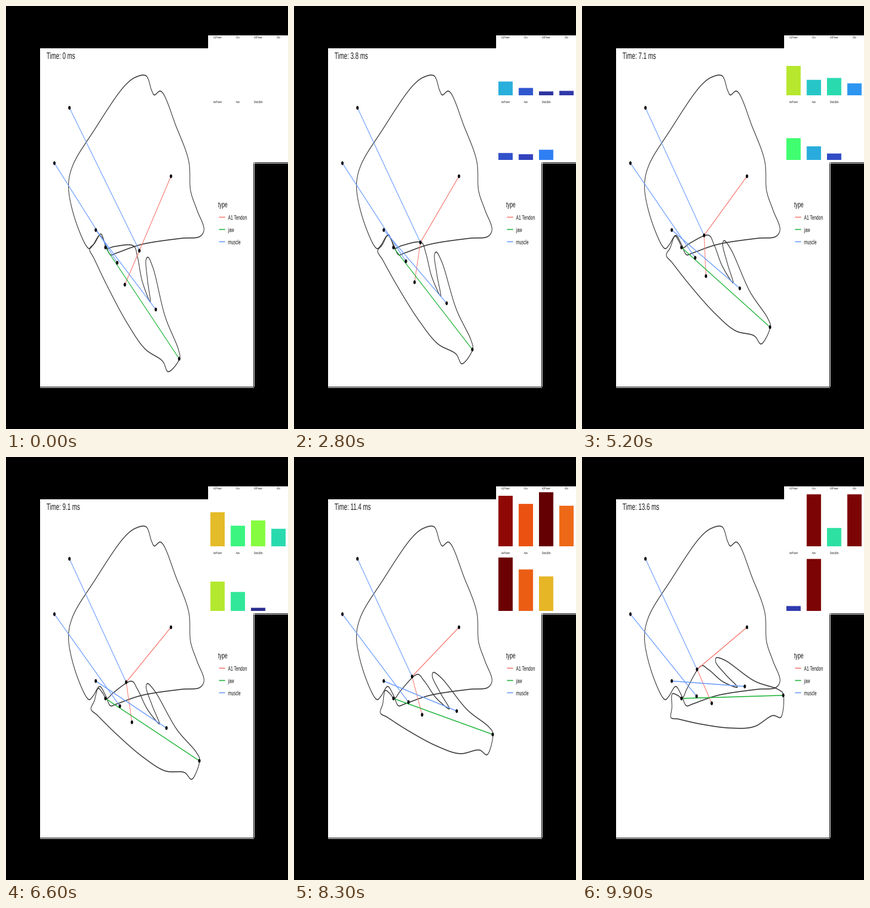
Write a matplotlib script that moves like this. It is 480 px wide and 720 px high and loops after 10 s.

```python
import numpy as np
import matplotlib.pyplot as plt
from matplotlib.animation import FuncAnimation
from matplotlib.colors import LinearSegmentedColormap
from matplotlib.patches import Ellipse, PathPatch, Rectangle
from matplotlib.path import Path
from matplotlib.textpath import TextPath
from matplotlib.transforms import Affine2D

W, H, DPI, N = 480, 720, 100, 100
SQUEEZE = 1.585                      # the whole plot is narrowed by this factor
ASPECT = np.array([SQUEEZE, 1])
STROKE = 1.6
INK, RED, GREEN, BLUE = "#303030", "#f8766d", "#1fb53a", "#6b9cff"
HEAT = LinearSegmentedColormap.from_list("heat", [
    "#24195c", "#323fb9", "#2f87fc", "#24d0c0", "#40fe70", "#98fb31",
    "#ddce2c", "#f4901f", "#e9460f", "#aa0c05", "#640004"])
BAR_MAX = 92

PIVOT = np.array([169.3, 411])
BACK, LEFT, TOP, INNER = (108, 173.3), (82.4, 267.5), (280.8, 289.8), (152.8, 381.3)
# tendon end, two muscle ends and jaw tip, all fixed to the jaw
ENDS = [(202.3, 474.3), (189.3, 437), (255, 516.6), (294.8, 600.4)]

SKULL = [
    (238, 118.5), (248, 144), (252.5, 151.5), (263, 144.8), (290, 206), (311, 264),
    (314.3, 315), (325, 347), (337, 381), (330, 392.3), (298, 395.5), (230, 406),
    (188, 420.5), (178, 423.5), (169, 405), (159.5, 390.5), (148, 407),
    (141.5, 413), (122, 376), (106.5, 310), (113, 273), (151, 210), (201, 137),
    (220, 121.5)]
JAW = [
    (171, 412.5), (184, 409.5), (217, 408.3), (223.7, 427), (232, 469),
    (245.5, 503.5), (240.8, 466), (238.5, 431), (241.5, 427.5), (250, 445),
    (271, 529), (293.5, 585), (295.5, 600), (276, 622.5), (266.5, 604.5),
    (237, 584), (207, 541), (173, 478), (150, 430), (142.3, 413.5),
    (150.5, 404.3), (161.5, 388), (167, 400)]


def smooth(pts, n=400):
    """Closed cubic curve through the points, centripetal spacing."""
    p = np.array(pts[-2:] + pts + pts[:3], float)
    k = np.r_[0, np.cumsum(np.sqrt(np.hypot(*np.diff(p, axis=0).T)))]
    m = np.gradient(p, k, axis=0)
    at = np.linspace(k[2], k[-3], n, endpoint=False)
    i = np.searchsorted(k, at, side="right") - 1
    d = (k[i + 1] - k[i])[:, None]
    t = (at - k[i])[:, None] / d
    return ((1 + 2 * t) * (1 - t) ** 2 * p[i] + t * (1 - t) ** 2 * d * m[i]
            + t * t * (3 - 2 * t) * p[i + 1] + t * t * (t - 1) * d * m[i + 1])


def ribbon(pts, closed=False):
    """Outline of a pen stroke that is narrowed together with the plot."""
    q = np.asarray(pts, float) * ASPECT
    t = np.roll(q, -1, 0) - np.roll(q, 1, 0) if closed else np.gradient(q, axis=0)
    n = np.column_stack([-t[:, 1], t[:, 0]])
    n *= STROKE / 2 / np.maximum(np.hypot(*t.T), 1e-9)[:, None]
    a, b = (q + n) / ASPECT, ((q - n) / ASPECT)[::-1]
    if not closed:
        return Path(np.vstack([a, b, a[:1]]), closed=True)
    return Path.make_compound_path(*(Path(np.vstack([s, s[:1]]), closed=True) for s in (a, b)))


def rotate(pts, deg):
    x, y = ((np.asarray(pts, float) - PIVOT) * ASPECT).T
    c, s = np.cos(np.radians(deg)), np.sin(np.radians(deg))
    return np.column_stack([x * c + y * s, y * c - x * s]) / ASPECT + PIVOT


def glyphs(text, x, y, size, center=False):
    path = TextPath((0, 0), text, size=size, prop={"family": "Liberation Sans"})
    if center:
        x -= path.get_extents().width / SQUEEZE / 2
    return path.transformed(Affine2D().scale(1 / SQUEEZE, -1).translate(x, y))


def clock_path(f):
    ms = f"{13.6 * f / (N - 1):.1f}" if f else "0"
    return glyphs(f"Time: {ms} ms", 69, 90, 15.7)


def ease(u, start, end):
    x = np.clip((u - start) / (end - start), 0, 1)
    return x * x * (3 - 2 * x)


def closing(u):
    """Jaw rotation in degrees."""
    return 44.7 * u**2 + 102 * u**3 * (1 - u) * (0.765 - u)


def bend(u):
    """Where the upper muscle pulls on the tendon."""
    return np.array([227 - 48 * u + 22 * u**2 - 5.2 * u**8,
                     416.5 - 49.5 * u - 5.5 * u**8])


def surge(u):
    return ease(u, 0.667, 0.9)


def fade(u):
    return ease(u, 0.86, 1)


def speed(p):
    return lambda u: 57 * u**p + 31.5 * surge(u)


def power(top, p, half, jump, loss):
    return lambda u: ((top * u**p / (u**p + half) + jump * surge(u))
                      * (1 - loss * fade(u)))


def static_bite(u):
    return (max(20 - 33 * u * u, 0) + 71 * surge(u)) * (1 - fade(u)) * (u > 0)


BARS = {
    "A1Power": power(72, 2.5, 0.088, 27.4, 1),
    "A1v": speed(1.2),
    "A3Power": power(82.7, 3, 0.261, 42, 0.71),
    "A3v": speed(1.6),
    "AwPower": power(87.5, 2.5, 0.273, 35.6, 0.92),
    "Awv": speed(1.4),
    "StaticBite": static_bite,
}

fig = plt.figure(figsize=(W / DPI, H / DPI), dpi=DPI, facecolor="black")
ax = fig.add_axes([0, 0, 1, 1])
ax.set(xlim=(0, W), ylim=(H, 0))
ax.axis("off")


def fill(path, color, z=3):
    return ax.add_patch(PathPatch(path, fc=color, lw=0, zorder=z, snap=False))


def box(x, y, w, h, color, z=1):
    return ax.add_patch(Rectangle((x, y), w, h, fc=color, lw=0, zorder=z, snap=False))


def dot(x, y):
    return ax.add_patch(Ellipse((x, y), 4.2, 6.5, fc="#0c0c10", lw=0, zorder=6))


box(58, 72, 363, 576, "white")
box(344, 50, 136, 216, "white")
for xs, ys in [((421.5, 421.5), (266, 648)), ((58, 422), (648.5, 648.5)), ((421, 480), (266.5, 266.5))]:
    ax.plot(xs, ys, color="white", lw=72 / DPI, dashes=(1, 1),
            dash_capstyle="butt", antialiased=False)

fill(glyphs("type", 361, 342.5, 13.4), "#111111")
for i, (name, color) in enumerate([("A1 Tendon", RED), ("jaw", GREEN), ("muscle", BLUE)]):
    y = 359.5 + 20.9 * i
    fill(ribbon([(362.5, y), (373, y)]), color)
    fill(glyphs(name, 378, y + 4.2, 10.7), "#111111")

bars = []
for i, (name, height) in enumerate(BARS.items()):
    x, base = 347.9 + 34.55 * (i % 4), 152 + 110 * (i // 4)
    bars.append((box(x, base, 24.4, 0, "white", 2), base, height))
    fill(glyphs(name, x + 12.2, base - 96.8, 5.6, True), "#222222")

fill(ribbon(smooth(SKULL), True), INK)
jaw_curve = smooth(JAW)
jaw = fill(ribbon(jaw_curve, True), INK)
clock = fill(clock_path(0), "#181818")
lines = [fill(ribbon([TOP, PIVOT]), c, 4) for c in (RED, RED, GREEN, BLUE, BLUE, BLUE)]
for p in (BACK, LEFT, TOP, INNER, PIVOT):
    dot(*p)
moving = [dot(*p) for p in [*ENDS, bend(0)]]


def update(f):
    u = f / (N - 1)
    angle, m = closing(u), bend(u)
    tendon, low, front, tip = ends = rotate(ENDS, angle)
    jaw.set_path(ribbon(rotate(jaw_curve, angle), True))
    pairs = [(TOP, m), (m, tendon), (PIVOT, tip), (BACK, m), (LEFT, low), (INNER, front)]
    for line, pair in zip(lines, pairs):
        line.set_path(ribbon(pair))
    for d, p in zip(moving, [*ends, m]):
        d.set_center(p)
    for bar, base, height in bars:
        h = np.clip(height(u), 0, BAR_MAX)
        bar.set(y=base - h, height=h, facecolor=HEAT(h / BAR_MAX))
    clock.set_path(clock_path(f))
    return [jaw, clock, *lines, *moving]


anim = FuncAnimation(fig, update, frames=N, interval=100, repeat=True, repeat_delay=0)
plt.show()
```
